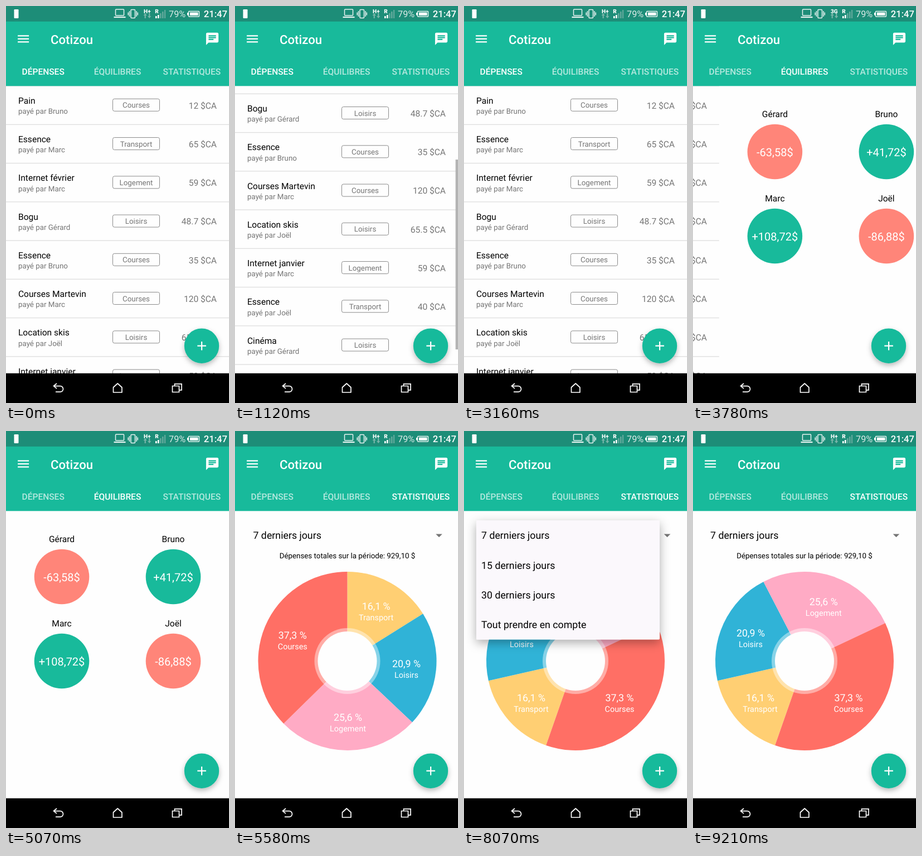
Write an HTML page that moves like this. It is 400 px wide and 711 px high and loops after 9300 ms.

```html
<!DOCTYPE html>
<html lang="fr">
<head>
<meta charset="utf-8">
<title>Dépenses partagées</title>
<style>
  html, body { margin: 0; width: 100%; height: 100%; overflow: hidden; background: #fefefe; }
  svg { display: block; width: 100%; height: 100%; font-family: Roboto, sans-serif; text-rendering: geometricPrecision; }
</style>
</head>
<body>
<svg id="stage" viewBox="0 0 400 711" xmlns="http://www.w3.org/2000/svg">
  <defs>
    <clipPath id="view"><rect y="143" width="400" height="515"/></clipPath>
    <filter id="shadow" x="-40%" y="-40%" width="180%" height="190%">
      <feDropShadow dx="0" dy="4" stdDeviation="5" flood-color="#000" flood-opacity=".27"/>
    </filter>
    <filter id="softShadow" x="-20%" y="-20%" width="140%" height="150%">
      <feDropShadow dx="0" dy="6" stdDeviation="9" flood-color="#000" flood-opacity=".32"/>
    </filter>
  </defs>
  <rect width="400" height="711" fill="#fefefe"/>
  <g clip-path="url(#view)">
    <g id="expenses"><g id="list"></g></g>
    <g id="balances"></g>
    <g id="stats">
      <g id="pie"></g>
      <circle cx="200" cy="412" r="59" fill="#fff" opacity=".42"/>
      <circle cx="200" cy="412" r="53" fill="#fefefe"/>
      <g id="pieLabels"></g>
      <path d="M358.7 184.5h11.6l-5.8 5.8z" fill="#757575"/>
    </g>
    <rect id="thumb" x="395.6" width="4.4" height="340" fill="#b3b3b3"/>
    <g id="popup"><rect x="22" y="160" width="329" height="213.5" rx="2" fill="#fbf8fc" filter="url(#softShadow)"/></g>
  </g>

  <rect width="400" height="143.3" fill="#18ba9b"/>
  <rect width="400" height="27.8" fill="#1d8d78"/>
  <g id="status" fill="#fff">
    <rect x="14.5" y="6" width="8" height="16" rx="1.2"/>
    <g fill="none" stroke="#e8f3f1" stroke-width="1.5">
      <rect x="196.5" y="6" width="15" height="11" rx="1"/>
      <path d="M193.5 20h21" stroke-width="2.2"/>
      <rect x="224" y="6.5" width="7.5" height="15" rx="1.2"/>
      <path d="M221.5 9v10M234 9v10M219.2 11.5v5M236.3 11.5v5"/>
      <rect x="327.5" y="9.5" width="19" height="9.5" rx="1"/>
    </g>
    <path d="M330 11.5h14.5v5.5H330zM325 12h2v4.5h-2z"/>
    <path d="M246.5 17l3.2-4 3.2 4h-2.1v5h-2.2v-5zM254 18h2.1v-5h2.2v5h2.1l-3.2 4z" fill="#78b5a9"/>
    <path d="M268 18h2.6v4H268zM272 16h2.6v6H272z"/>
    <path d="M276 13h2.6v9H276zM280 10h2.6v12H280zM284 7h2.2v15H284z" fill="#62a99c"/>
  </g>
  <path d="M21.1 53.3h20M21.1 58.9h20M21.1 64.4h20" stroke="#fff" stroke-width="2.2"/>
  <path transform="translate(356.7 45.5) scale(1.11)" fill="#fff" fill-rule="evenodd"
    d="M20 2H4c-1.1 0-2 .9-2 2v18l4-4h14c1.1 0 2-.9 2-2V4c0-1.1-.9-2-2-2zM6 9h12v2H6zM6 12h8v2H6zM6 6h12v2H6z"/>
  <g id="tabs"></g>

  <circle cx="351" cy="608.7" r="31.2" fill="#18ba9b" filter="url(#shadow)"/>
  <path d="M343.3 608.7h15.6M351.1 600.9v15.6" stroke="#fff" stroke-width="2.2"/>

  <rect y="657.8" width="400" height="53.2" fill="#000"/>
  <g fill="none" stroke="#fff" stroke-width="1.7">
    <path d="M91 676l-5.5 4.6 5.5 4.6M85.5 680.6h11.7a5.3 5.3 0 0 1 0 10.6H89"/>
    <path d="M192.5 683l7.7-7 7.7 7v9h-15.4z" stroke-linejoin="round"/>
    <path d="M298.5 680.5h12v11h-12zM302.5 680v-3.2H315v11h-4"/>
  </g>
</svg>
<script>
const LOOP = 9300;
const TEAL = '#18ba9b', SALMON = '#ff8579', GREY = '#757575';
const $ = id => document.getElementById(id);

function add(parent, tag, attrs, content = '') {
  const node = document.createElementNS('http://www.w3.org/2000/svg', tag);
  for (const key in attrs) node.setAttribute(key, attrs[key]);
  node.textContent = content;
  parent.appendChild(node);
  return node;
}

const text = (parent, content, x, y, size, fill, anchor = 'start', weight = 400) =>
  add(parent, 'text', { x, y, 'font-size': size, fill, 'text-anchor': anchor, 'font-weight': weight }, content);

// Header
const stage = $('stage'), status = $('status');
text(stage, 'Cotizou', 80, 67.5, 22.2, '#fff', 'start', 500);
const network = text(status, 'H+', 253.3, 12.5, 10, '#fff', 'middle', 900);
text(status, 'R', 270.5, 13.2, 10, '#fff', 'middle', 900);
text(status, '79%', 292, 20, 16.3, '#dcebe8');
text(status, '21:47', 354.8, 20.3, 16.6, '#fff', 'start', 500);
const tabs = [['DÉPENSES', 66.67], ['ÉQUILIBRES', 200], ['STATISTIQUES', 333.33]]
  .map(([label, x]) => text($('tabs'), label, x, 122.7, 15.56, '#fff', 'middle', 500));

// Expense list
const ROW = 69.25;
const expenses = [
  ['Pain', 'Bruno', 'Courses', '12'],
  ['Essence', 'Marc', 'Transport', '65'],
  ['Internet février', 'Marc', 'Logement', '59'],
  ['Bogu', 'Gérard', 'Loisirs', '48.7'],
  ['Essence', 'Bruno', 'Courses', '35'],
  ['Courses Martevin', 'Marc', 'Courses', '120'],
  ['Location skis', 'Joël', 'Loisirs', '65.5'],
  ['Internet janvier', 'Marc', 'Logement', '59'],
  ['Essence', 'Joël', 'Transport', '40'],
  ['Cinéma', 'Gérard', 'Loisirs', '32'],
  ['Courses', 'Bruno', 'Courses', '85']
];
const divider = y => add($('list'), 'rect', { y: y - 0.6, width: 400, height: 1.3, fill: '#dedede' });
divider(0);
expenses.forEach(([title, payer, category, price], i) => {
  const row = add($('list'), 'g', { transform: `translate(0 ${i * ROW})` });
  text(row, title, 22, 31.8, 15.56, '#000');
  text(row, 'payé par ' + payer, 22, 50.2, 13.33, GREY);
  add(row, 'rect', { x: 191.5, y: 23.3, width: 84, height: 22, rx: 3, fill: 'none', stroke: '#8a8a8a' });
  text(row, category, 233.5, 39.4, 13.33, GREY, 'middle');
  text(row, price + ' $CA', 378, 40.5, 15.56, GREY, 'end');
  divider((i + 1) * ROW);
});

// Balances
[['Gérard', '-63,58$', 100, 261], ['Bruno', '+41,72$', 300, 261],
 ['Marc', '+108,72$', 100, 412], ['Joël', '-86,88$', 300, 412]].forEach(([name, amount, cx, cy]) => {
  const page = $('balances');
  text(page, name, cx, cy - 62, 15.56, '#000', 'middle');
  add(page, 'circle', { cx, cy, r: 49.3, fill: amount[0] === '+' ? TEAL : SALMON });
  text(page, amount, cx, cy + 7.5, 20, '#fff', 'middle');
});

// Statistics
text($('stats'), '7 derniers jours', 31, 193.4, 17.78, '#000');
text($('stats'), 'Dépenses totales sur la période: 929,10 $', 200, 228, 13.33, '#000', 'middle');
['7 derniers jours', '15 derniers jours', '30 derniers jours', 'Tout prendre en compte']
  .forEach((label, i) => text($('popup'), label, 31, 193.4 + i * 53.33, 17.78, '#000'));

const polar = (degrees, r) => {
  const a = degrees * Math.PI / 180;
  return [200 + r * Math.sin(a), 412 - r * Math.cos(a)];
};
let start = 0;
const slices = [['Transport', 16.1, '#ffcf73'], ['Loisirs', 20.9, '#30b3d7'],
  ['Logement', 25.6, '#ffabc5'], ['Courses', 37.3, '#ff6f65']].map(([name, share, fill]) => {
  const sweep = share / 99.9 * 360;
  const from = polar(start, 160), to = polar(start + sweep, 160);
  add($('pie'), 'path', { d: `M200 412L${from}A160 160 0 0 1 ${to}z`, fill });
  const label = add($('pieLabels'), 'g', {});
  text(label, share.toFixed(1).replace('.', ',') + ' %', 0, 0.8, 17.78, '#fff', 'middle');
  text(label, name, 0, 19.8, 14.44, '#fff', 'middle');
  const middle = start + sweep / 2;
  start += sweep;
  return { label, middle };
});

// Motion
const ramp = (t, from, to) => Math.min(1, Math.max(0, (t - from) / (to - from)));
const smooth = u => u * u * (3 - 2 * u);
const swipe = u => 1 - (1 - u) ** 5 * (1 + 5 * u);

const scrollAt = t =>
  6.5 + 193.5 * smooth(ramp(t, 40, 950)) - 200 * smooth(ramp(t, 1150, 2150)) + 6.5 * smooth(ramp(t, 2220, 2850));

const rotationAt = t =>
  74.7 * ramp(t, 5970, 6660) ** 1.15 + 124.6 * (1 - (1 - ramp(t, 6660, 7800)) ** 1.3);

const move = (node, x, y = 0) => node.setAttribute('transform', `translate(${x} ${y})`);

function render(t) {
  const page = swipe(ramp(t, 3390, 4185)) + swipe(ramp(t, 5220, 5694));
  ['expenses', 'balances', 'stats'].forEach((id, i) => {
    move($(id), (i - page) * 400);
    $(id).setAttribute('visibility', Math.abs(i - page) < 1 ? 'visible' : 'hidden');
    tabs[i].setAttribute('opacity', Math.round(page) === i ? 1 : 0.68);
  });
  network.textContent = t >= 3390 && t < 4800 ? '3G' : 'H+';

  const scroll = scrollAt(t);
  move($('list'), 0, 149.5 - scroll);
  $('thumb').setAttribute('y', 143 + scroll * 340 / 515);
  $('thumb').setAttribute('opacity', t < 40 ? 0 : 1 - ramp(t, 2900, 3160));

  const rotation = rotationAt(t);
  $('pie').setAttribute('transform', `rotate(${rotation} 200 412)`);
  slices.forEach(({ label, middle }) => move(label, ...polar(middle + rotation, 106.5)));

  $('popup').setAttribute('opacity', ramp(t, 7860, 8020) * (1 - ramp(t, 8880, 9060)));
}

const origin = performance.now();
function tick() {
  render((performance.now() - origin) % LOOP);
  requestAnimationFrame(tick);
}
render(0);
tick();
</script>
</body>
</html>
```
